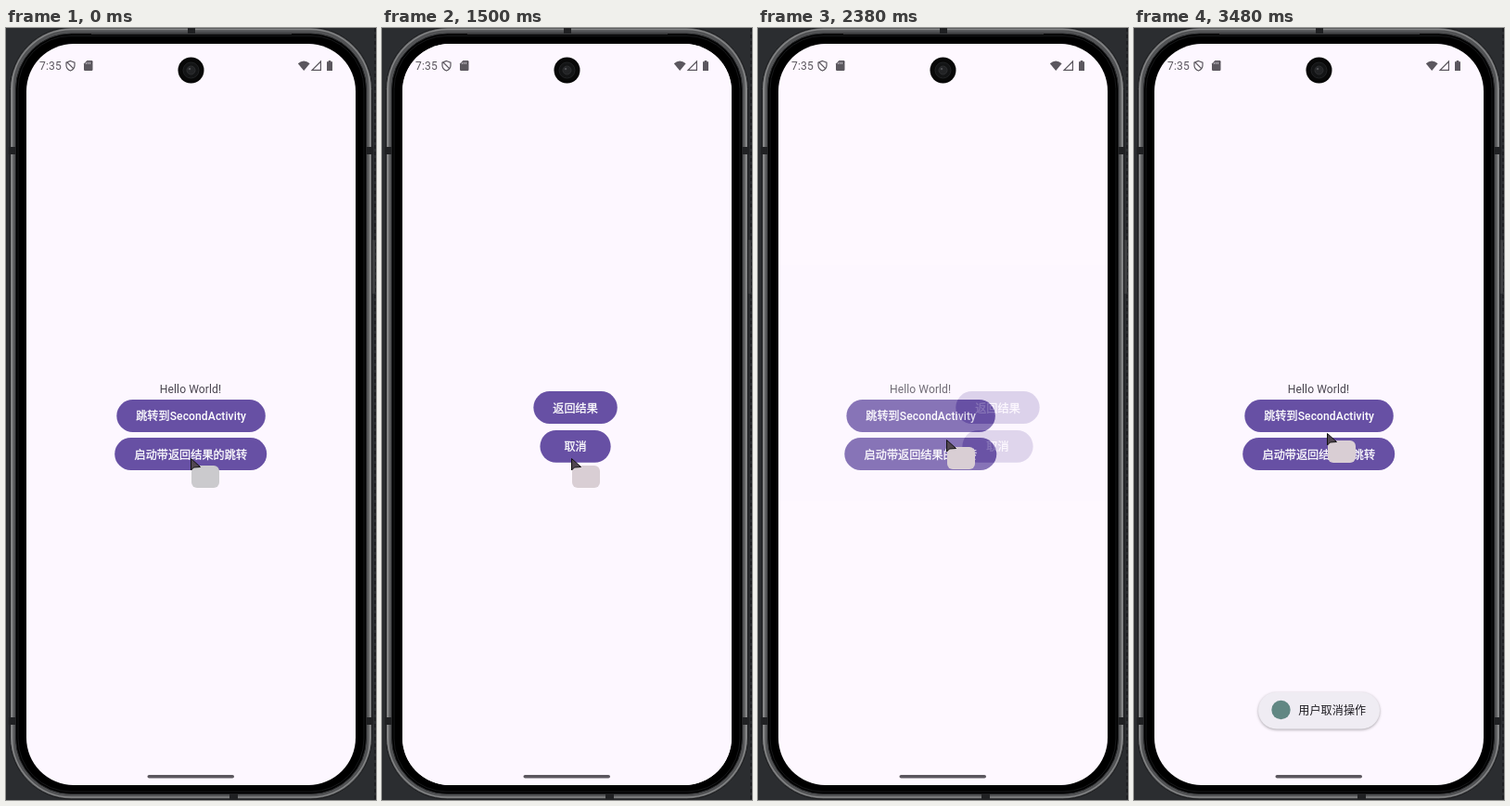
Recreate the animation shown at these times as an HTML page. Size 399 px wide and 831 px high, loop 3810 ms.

```html
<!DOCTYPE html>
<html lang="zh-CN">
<head>
<meta charset="utf-8">
<title>Activity result demo</title>
<style>
  html, body { margin: 0; width: 100%; height: 100%; overflow: hidden; background: #2b2d30; }
  svg { display: block; width: 399px; height: 831px; }
  text { font: 400 12.07px Roboto, "Noto Sans CJK SC", sans-serif; letter-spacing: .1px; }
  .label { font-weight: 500; fill: #fff; text-anchor: middle; }
  .cjk { stroke: #fff; stroke-width: .3px; }
  .button { fill: #6750a4; }
  .icon { fill: #5b575e; }
  .toast { filter: drop-shadow(0 1.5px 1.5px #0005); }
</style>
</head>
<body>
<svg viewBox="0 0 399 831">
  <defs>
    <clipPath id="screen"><rect x="22" y="17" width="355" height="798" rx="51"/></clipPath>
    <radialGradient id="ripple" gradientUnits="userSpaceOnUse" cx="204" cy="463" r="1">
      <stop offset="0" stop-color="#fff" stop-opacity=".1"/>
      <stop offset=".75" stop-color="#fff" stop-opacity=".1"/>
      <stop offset="1" stop-color="#fff" stop-opacity="0"/>
    </radialGradient>
    <linearGradient id="metal">
      <stop offset="0" stop-color="#8b8c8d"/>
      <stop offset=".012" stop-color="#515254"/>
      <stop offset=".988" stop-color="#515254"/>
      <stop offset="1" stop-color="#8b8c8d"/>
    </linearGradient>
  </defs>

  <rect width="399" height="831" fill="#2b2d30"/>
  <path d="M398 0V831" stroke="#1e1f22" stroke-width="2" stroke-dasharray="4 3"/>
  <g id="phone">
    <rect x="394" y="228" width="4" height="58" rx="1.5" fill="#3f4042"/>
    <rect x="4.5" y="-.5" width="390" height="830.5" rx="66" fill="url(#metal)" stroke="#1b1c1e"/>
    <rect x="6.5" y="1.5" width="386" height="826.5" rx="64" fill="none" stroke="#858687" stroke-width="1.4"/>
    <rect x="10.5" y="6" width="378" height="818.5" rx="60" stroke="#222325"/>
    <rect x="13" y="8.5" width="373" height="813.5" rx="57" fill="none" stroke="#17181a"/>
    <path d="M92 6.5H308" stroke="#3c3d3f"/>
    <g fill="#202123">
      <rect x="3" y="128" width="8" height="8"/>
      <rect x="388" y="128" width="8" height="8"/>
      <rect x="3" y="742" width="8" height="8"/>
      <rect x="388" y="742" width="8" height="8"/>
      <rect x="196" y="0" width="8" height="6"/>
      <rect x="241" y="824" width="9" height="7"/>
    </g>
  </g>

  <g clip-path="url(#screen)">
    <rect x="22" y="17" width="355" height="798" fill="#fdf7ff"/>
    <g id="main">
      <text x="199" y="393" text-anchor="middle" fill="#49454f">Hello World!</text>
      <rect class="button" x="119.3" y="400" width="160.5" height="35" rx="17.5"/>
      <text class="label" x="199.6" y="422.4"><tspan class="cjk">跳转到</tspan>SecondActivity</text>
      <rect class="button" x="117.2" y="441" width="164" height="35" rx="17.5"/>
      <rect id="startGlow" x="117.2" y="441" width="164" height="35" rx="17.5" fill="url(#ripple)"/>
      <text class="label cjk" x="199.3" y="463.6">启动带返回结果的跳转</text>
    </g>
    <g id="second">
      <rect x="-100" y="17" width="600" height="798" fill="#fdf7ff"/>
      <rect class="button" x="154.2" y="391" width="90.4" height="35" rx="17.5"/>
      <text class="label cjk" x="199.4" y="413.5">返回结果</text>
      <rect class="button" x="161.3" y="433" width="76.2" height="34.7" rx="17.3"/>
      <rect id="cancelGlow" x="161.3" y="433" width="76.2" height="34.7" rx="17.3" fill="url(#ripple)"/>
      <text class="label cjk" x="199.4" y="455">取消</text>
    </g>

    <text x="36" y="45" fill="#5b575e" style="letter-spacing:.2px">7:35</text>
    <g fill="none" stroke="#5b575e" stroke-width="1.2">
      <path d="M69.5 35.5l4.5 1.6v3.2c0 2.8-1.9 4.7-4.5 5.7-2.6-1-4.5-2.9-4.5-5.7v-3.2zM65.5 36.5l7.7 7.7"/>
      <path d="M339.4 36v9.3h-9.3z"/>
    </g>
    <g class="icon">
      <path d="M87.4 35h4.9q1.2 0 1.2 1.2v8.6q0 1.2-1.2 1.2h-7.1q-1.2 0-1.2-1.2v-6.4z"/>
      <path d="M314.8 38.2q6.4-5.4 12.8 0l-6.4 7.8z"/>
      <path d="M347.7 35h2.6v1.2h1.7v9.8h-6v-9.8h1.7z"/>
      <rect x="152.5" y="803.9" width="93.5" height="3.7" rx="1.8"/>
    </g>
    <path d="M86.5 37v2M88.5 36.5v2.5M90.5 36.5v2.5" stroke="#fdf7ff" stroke-width=".6"/>

    <g id="toast" class="toast">
      <rect x="134" y="715" width="131" height="39.5" rx="19.7" fill="#efecf3"/>
      <circle id="badge" cx="158.5" cy="734" r="10.2"/>
      <text x="177.3" y="739.3" fill="#1d1b20">用户取消操作</text>
    </g>
  </g>

  <g id="camera">
    <circle cx="199.5" cy="45.5" r="14" fill="#080808"/>
    <circle cx="199.5" cy="45.5" r="8.5" fill="#131415" stroke="#222325"/>
    <circle cx="199.5" cy="45.5" r="4.5" fill="#222325" stroke="#2e2f31"/>
    <circle cx="198" cy="44" r="1.3" fill="#4c4d50"/>
  </g>

  <g id="cursor">
    <rect id="head" x="1" y="8" width="30" height="24" rx="6"/>
    <path d="M.5.5v12.5l3-3 7-.5z" fill="#514650" stroke="#111"/>
  </g>
</svg>
<script>
const LOOP = 3810;
const SLIDE = 83, SLIDE_MS = 450;
const OPEN = 1328, CLOSE = 2280;
const TICKS = [0, 940, 1160, 1230, 1300, 1360, 1430, 1490, 1560, 1630, 1700, 1770, 1900, 1970,
  2040, 2110, 2180, 2250, 2310, 2380, 2450, 2520, 2590, 2660, 2730, 2800, 2870];
const $ = id => document.getElementById(id);
const ramp = (t, start, ms) => Math.min(1, Math.max(0, (t - start) / ms));
const bez = (a, b, c, d, u) => {
  const v = 1 - u;
  return a * v * v * v + 3 * b * v * v * u + 3 * c * v * u * u + d * u * u * u;
};

// Fast start with a very long settle, made of two cubic pieces.
const EASE = [
  { x: [0, .05, .1333, .1667], y: [0, 0, .06, .4] },
  { x: [.1667, .2083, .25, 1], y: [.4, .82, 1, 1] }
];
function ease(p) {
  if (p <= 0 || p >= 1) return p <= 0 ? 0 : 1;
  const part = EASE[p < .1667 ? 0 : 1];
  let lo = 0, hi = 1;
  for (let i = 0; i < 24; i++) {
    const mid = (lo + hi) / 2;
    if (bez(...part.x, mid) < p) lo = mid; else hi = mid;
  }
  return bez(...part.y, lo);
}

// Cursor stops: time, x, y
const PATH = [[870, 199, 463], [940, 204, 463], [1970, 204, 463], [2110, 203, 443],
  [2730, 203, 443], [2870, 208, 436]];
function cursorAt(t) {
  let [, x, y] = PATH[0];
  for (let i = 1; i < PATH.length; i++) {
    const [t0, x0, y0] = PATH[i - 1], [t1, x1, y1] = PATH[i];
    if (t < t0) break;
    const k = ramp(t, t0, t1 - t0);
    x = x0 + (x1 - x0) * k;
    y = y0 + (y1 - y0) * k;
  }
  return [Math.round(x), Math.round(y)];
}

const move = (id, x, y = 0) => $(id).setAttribute("transform", `translate(${x} ${y})`);
const fade = (id, a) => $(id).setAttribute("opacity", a);

function draw(time) {
  const t = TICKS.filter(v => v <= time).pop();
  const open = ease(ramp(t, OPEN, SLIDE_MS));
  const close = ease(ramp(t, CLOSE, SLIDE_MS));
  const closing = t >= CLOSE;

  move("main", closing ? SLIDE * (close - 1) : -SLIDE * open);
  move("second", closing ? SLIDE * close : SLIDE * (1 - open));
  fade("second", closing ? 1 - ramp(t, CLOSE + 35, 83) : ramp(t, OPEN + 50, 83));

  const onCancel = t >= 2000;
  const press = onCancel ? 2110 : 1160;
  const glow = $("ripple");
  glow.setAttribute("cx", onCancel ? 203 : 204);
  glow.setAttribute("cy", onCancel ? 443 : 463);
  glow.setAttribute("r", 1 + 130 * ramp(t, press, 225));
  const strength = ramp(t, press - 40, 80) * (1 - ramp(t, press + 250, 300));
  fade("startGlow", onCancel ? 0 : strength);
  fade("cancelGlow", onCancel ? strength : 0);

  fade("toast", ramp(t, 2400, 150));
  $("badge").setAttribute("fill", t < 2660 ? "#5f5289" : "#618783");

  move("cursor", ...cursorAt(t));
  $("head").setAttribute("fill", t < 940 ? "#cbcacd" : "#d9ced4");
}

const begin = performance.now();
function frame() {
  draw((performance.now() - begin) % LOOP);
  requestAnimationFrame(frame);
}
frame();
</script>
</body>
</html>
```
